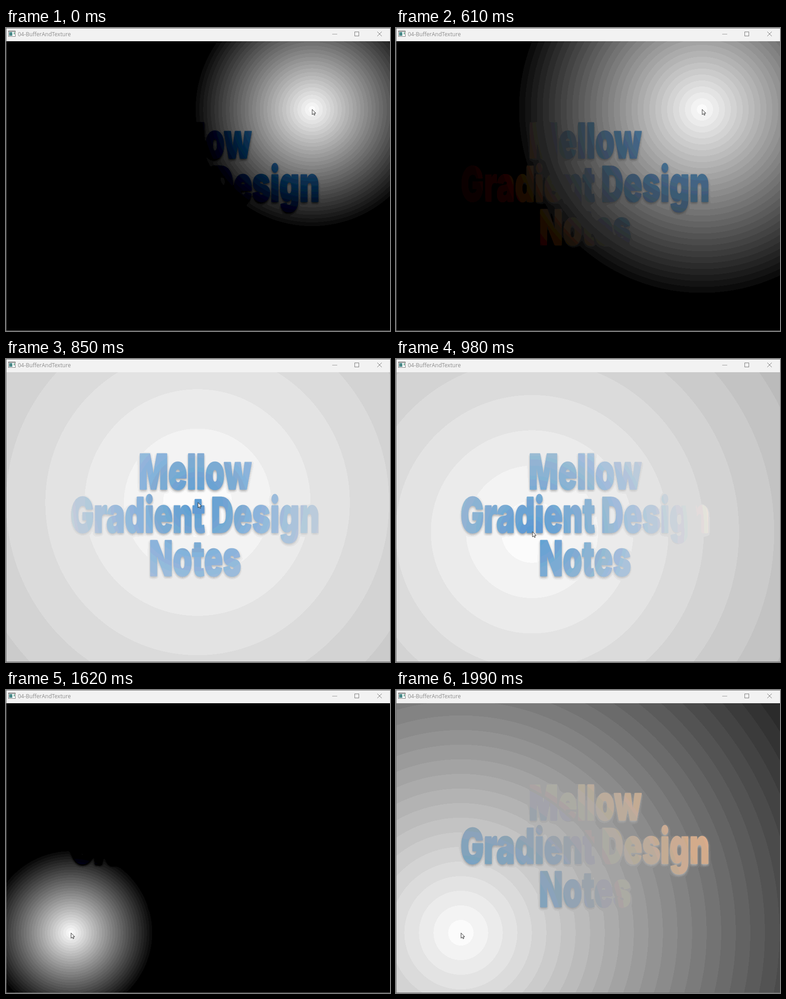
Write an HTML page with a canvas that moves like this. It is 844x664 px and loops after 2.09 s.

```html
<!DOCTYPE html>
<html lang="en">
<head>
<meta charset="utf-8">
<title>04-BufferAndTexture</title>
<style>
  html, body { margin: 0; width: 844px; height: 664px; overflow: hidden; }
  canvas { display: block; }
</style>
</head>
<body>
<canvas id="stage" width="844" height="664"></canvas>
<script>
const LOOP = 2090, LEFT = 1, TOP = 29, W = 843, H = 634;
const REACH = 350; // distance at which ink fades into the light
const ctx = document.getElementById('stage').getContext('2d');

// Time spans in which the picture stands still
const HOLDS = [[0, 30], [210, 400], [900, 950], [1440, 1620], [1990, LOOP]];
// [ms, degrees] of the falloff oscillation
const PHASE = [[0, -70], [400, 26], [710, 136], [980, 196], [1220, 283.6], [1620, 374], [1990, 497.6]];
// [ms, x, y] of the pointer
const PATH = [[0, 672, 178], [640, 672, 178], [710, 645, 193.5], [800, 520, 262], [900, 325, 364],
  [980, 299, 378], [1050, 270, 405], [1150, 180, 495], [1220, 151, 522], [1270, 142, 531.5], [LOOP, 142, 531.5]];

function track(points, t, col = 1) {
  const i = Math.max(1, points.findIndex(p => p[0] >= t));
  const a = points[i - 1], b = points[i];
  return a[col] + (b[col] - a[col]) * (t - a[0]) / (b[0] - a[0]);
}

function makeTexture() {
  const c = document.createElement('canvas');
  c.width = W;
  c.height = H;
  const g = c.getContext('2d', { willReadFrequently: true });
  g.fillStyle = '#fff';
  g.fillRect(0, 0, W, H);

  const layer = document.createElement('canvas');
  layer.width = W;
  layer.height = H;
  const ink = layer.getContext('2d');
  ink.font = '900 106px Inter, sans-serif';
  ink.textAlign = 'center';
  ink.fillStyle = ink.strokeStyle = '#5b9bd5';
  ink.lineWidth = 3;
  ink.lineJoin = 'round';
  ['Mellow', 'Gradient Design', 'Notes'].forEach((line, i) => {
    ink.setTransform(.64, 0, 0, 1, 415.5 - LEFT, 285 + 95 * i - TOP);
    ink.fillText(line, 0, 0);
    ink.strokeText(line, 0, 0);
  });

  g.shadowColor = 'rgba(0,0,0,.4)';
  g.shadowBlur = 5;
  g.shadowOffsetY = 3;
  g.drawImage(layer, 0, 0);
  return g.getImageData(0, 0, W, H).data;
}

const texture = makeTexture();
const view = ctx.createImageData(W, H);
const quantise = v => v < 8 ? 0 : v > 255 ? 251 : (v & 248) + 3;

function shade(cx, cy, falloff) {
  const out = view.data;
  for (let y = 0, i = 0; y < H; y++) {
    const dy = y + TOP - cy;
    for (let x = 0; x < W; x++, i += 4) {
      const dx = x + LEFT - cx, d = Math.sqrt(dx * dx + dy * dy);
      const light = 255 - 255 * falloff * d, near = 1 - d / REACH;
      for (let c = i; c < i + 3; c++) out[c] = quantise(light - (255 - texture[c]) * near);
      out[i + 3] = 255;
    }
  }
  ctx.putImageData(view, LEFT, TOP);
}

function rect(color, x, y, w, h) {
  ctx.fillStyle = color;
  ctx.fillRect(x, y, w, h);
}

function drawWindow() {
  rect('#707070', 0, 0, 844, 664);
  rect('#f2f2f2', 1, 1, 843, 28);
  rect('#777', 5, 6, 16, 13);
  rect('#fff', 6, 8, 14, 10);
  rect('#4a8a8a', 7, 9, 7, 8);
  rect('#5b9f86', 17, 9, 2, 5);
  ctx.fillStyle = '#8c8c8c';
  ctx.font = '12px "Open Sans", sans-serif';
  ctx.fillText('04-BufferAndTexture', 26, 18);
  ctx.strokeStyle = '#777';
  ctx.lineWidth = 1;
  ctx.strokeRect(766.5, 8.5, 9, 9);
  rect('#999', 717, 13, 11, 1);
  ctx.stroke(new Path2D('M816 8l10 10M826 8l-10 10'));
}

const arrow = new Path2D('M.5 .5v11.5l2.6-2.4 1.9 3.6 1.7-.8-1.7-3.6h3.5z');

function drawPointer(x, y) {
  ctx.save();
  ctx.translate(x, y);
  ctx.fillStyle = '#fff';
  ctx.strokeStyle = '#222';
  ctx.fill(arrow);
  ctx.stroke(arrow);
  ctx.restore();
}

function frame() {
  let t = performance.now() % LOOP;
  const hold = HOLDS.find(([from, to]) => t >= from && t < to);
  if (hold) t = hold[0];
  const x = track(PATH, t), y = track(PATH, t, 2);
  shade(x, y, .0029 + .0026 * Math.cos(track(PHASE, t) * Math.PI / 180));
  drawPointer(Math.round(x) + .5, Math.round(y));
  requestAnimationFrame(frame);
}

drawWindow();
frame();
</script>
</body>
</html>
```
